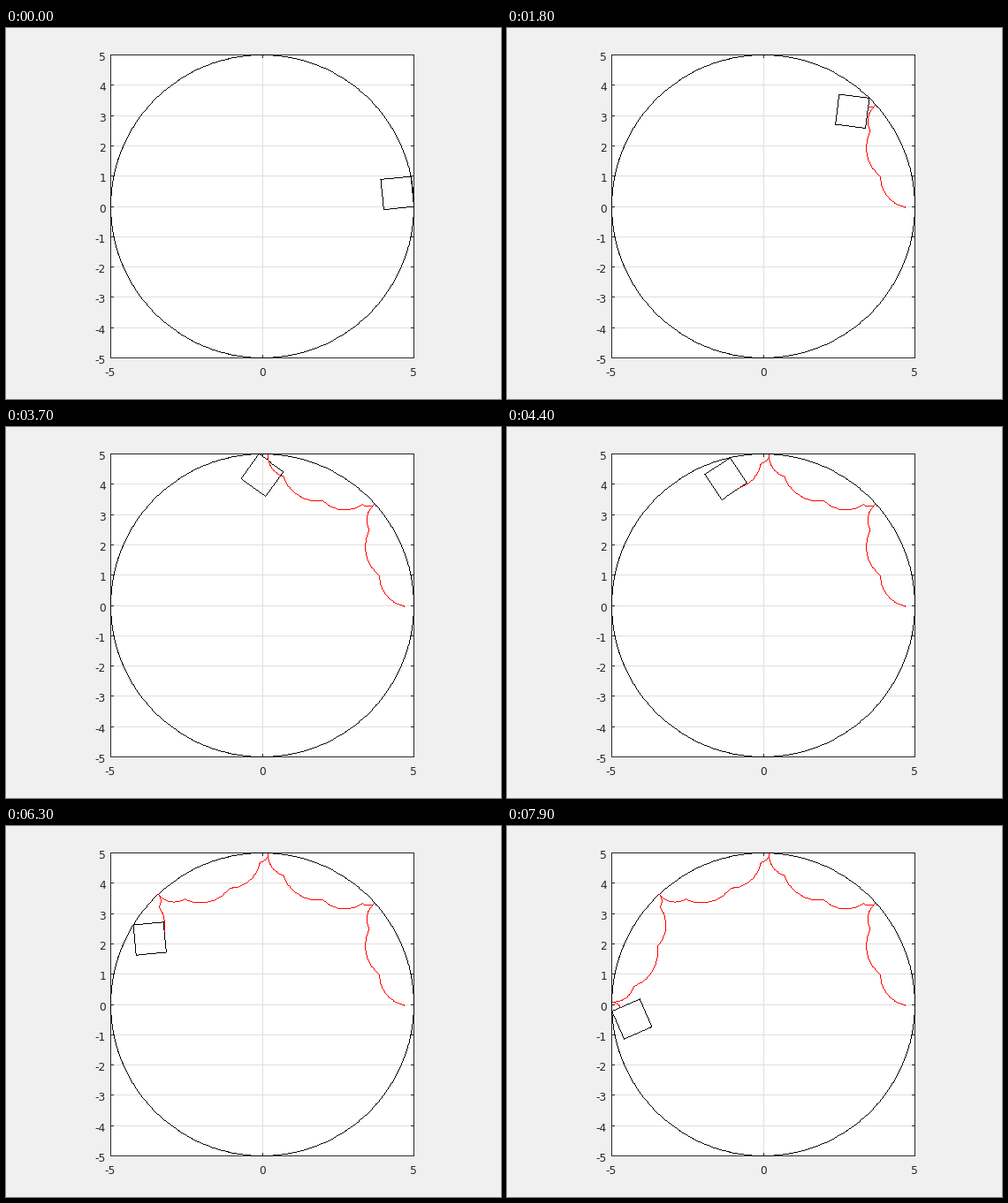
A matplotlib script that plays this animation: 560x420 px, repeating every 8000 ms.

```python
import numpy as np
import matplotlib.pyplot as plt
from matplotlib.animation import FuncAnimation

W, H, DPI = 560, 420, 100
FRAMES, STEP_MS = 80, 100
LEFT, RIGHT, TOP, BOTTOM = 118, 461, 31, 374
CX, CY, SCALE = (LEFT + RIGHT) / 2, (TOP + BOTTOM) / 2, 34.3
INK, GRID = "#262626", "#dfdfdf"

RADIUS, SIDE = 5.0, 1.0
PER_ROLL = 5                     # frames for one tip over a corner
TURN = 0.1992                    # angle between resting corners on the rim
SPIN = (np.pi / 2 - TURN) / PER_ROLL
PEN = 0.31                       # pen position along the first side


def to_px(z):
    z = np.asarray(z)
    return CX + SCALE * z.real, CY - SCALE * z.imag


def raster(x, y):
    """Pixels of a hard-edged polyline one pixel wide, kept inside the plot."""
    xs, ys = [x[:1]], [y[:1]]
    for x0, y0, x1, y1 in zip(x[:-1], y[:-1], x[1:], y[1:]):
        count = int(np.ceil(max(abs(x1 - x0), abs(y1 - y0)))) + 1
        xs.append(np.linspace(x0, x1, count))
        ys.append(np.linspace(y0, y1, count))
    px = np.floor(np.concatenate(xs) + 0.5)
    py = np.floor(np.concatenate(ys) + 0.5)
    keep = (px >= LEFT) & (px <= RIGHT) & (py >= TOP) & (py <= BOTTOM)
    return px[keep], py[keep]


def pose(n):
    """Corners of the rolling square as complex numbers, in body order."""
    roll, part = divmod(n, PER_ROLL)
    roll += 1
    pivot = RADIUS * np.exp(1j * TURN * roll)
    back = -1j * SIDE * np.exp(1j * (TURN * (roll - 0.5) - SPIN * part))
    ring = pivot + back * np.array([0, 1, 1 - 1j, -1j])
    # ring starts at the pivot; put the corners back in fixed order
    return np.array([ring[(roll - i) % 4] for i in range(4)])


def pen(n):
    c = pose(n)
    return c[0] + PEN * (c[3] - c[0])


trail = np.array([pen(n) for n in range(FRAMES)])

fig = plt.figure(figsize=(W / DPI, H / DPI), dpi=DPI, facecolor="#f0f0f0")
ax = fig.add_axes([0, 0, 1, 1])
ax.set_xlim(0, W)
ax.set_ylim(H, 0)
ax.axis("off")
ax.add_patch(plt.Rectangle((LEFT, TOP), RIGHT - LEFT + 1, BOTTOM - TOP + 1,
                           fc="white", ec="none"))


def dots(color, z):
    art, = ax.plot([], [], ls="none", marker=",", color=color, zorder=z)
    return art


def line(x, y, color, z=3):
    dots(color, z).set_data(*raster(np.asarray(x), np.asarray(y)))


def label(x, y, v, ha):
    ax.text(x, y, f"{v:d}", ha=ha, va="baseline", color=INK,
            fontsize=12.3 * 72 / DPI, family="DejaVu Sans")


for v in range(-5, 6):
    y = np.floor(CY - v * SCALE + 0.5)
    if abs(v) < 5:
        line([LEFT, RIGHT], [y, y], GRID, 2)
        line([LEFT, LEFT + 3], [y, y], INK)
        line([RIGHT - 3, RIGHT], [y, y], INK)
    label(113, y + 6, v, "right")
for v in (-5, 0, 5):
    x = np.floor(CX + v * SCALE + 0.5)
    if v == 0:
        line([x, x], [TOP, BOTTOM], GRID, 2)
        line([x, x], [TOP, TOP + 3], INK)
        line([x, x], [BOTTOM - 3, BOTTOM], INK)
    label(x, 394, v, "center")
line([LEFT, RIGHT, RIGHT, LEFT, LEFT], [TOP, TOP, BOTTOM, BOTTOM, TOP], INK)

rim = RADIUS * np.exp(1j * np.linspace(0, 2 * np.pi, 100))
line(*to_px(rim), "black", 4)
box = dots("black", 5)
path = dots("red", 6)


def draw(n):
    c = pose(n)
    box.set_data(*raster(*to_px(np.append(c, c[0]))))
    path.set_data(*(raster(*to_px(trail[:n + 1])) if n else ([], [])))
    return box, path


anim = FuncAnimation(fig, draw, frames=FRAMES, interval=STEP_MS,
                     repeat=True, repeat_delay=0, blit=False)
plt.show()
```
